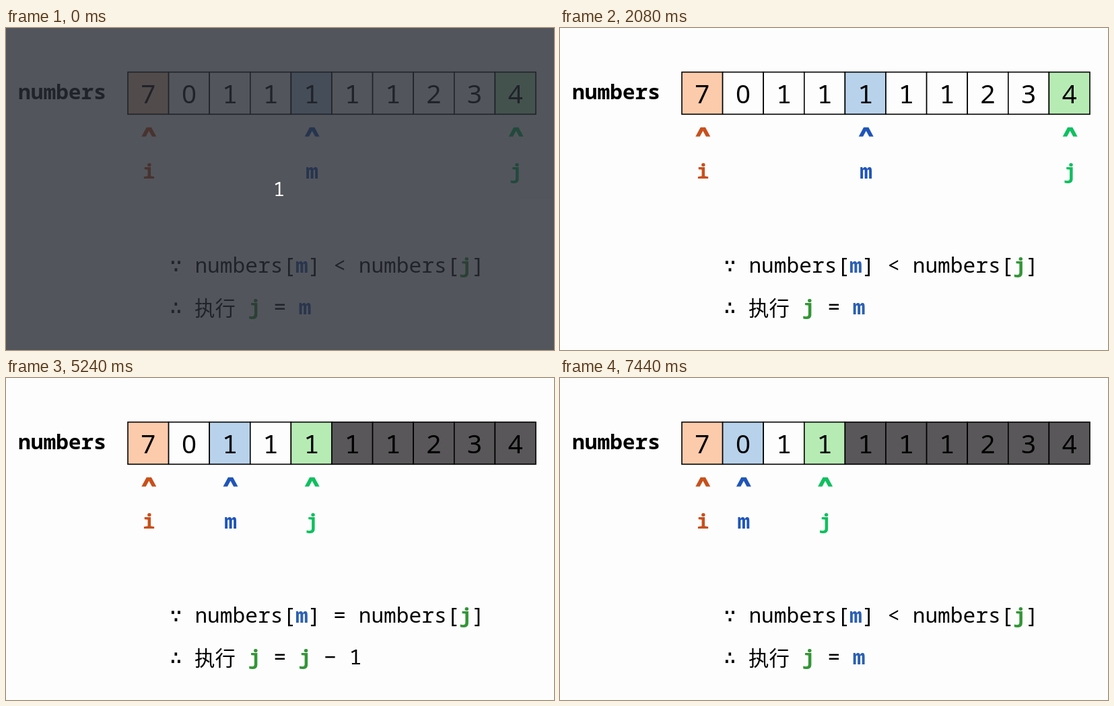
Write an HTML page that moves like this. It is 814 by 479 pixels and loops after 8000 ms.

```html
<!DOCTYPE html>
<html lang="zh-CN">
<head>
<meta charset="utf-8">
<title>numbers</title>
<style>
  html, body { margin: 0; width: 814px; height: 479px; overflow: hidden; background: #fefdfe; }
  svg { display: block; }
  text { font: 31.2px "Noto Sans Mono", "DejaVu Sans Mono", monospace; white-space: pre; }
  .bold { font-weight: 700; }
  .mid { text-anchor: middle; }
  .digit { font: 38.5px "Noto Sans", sans-serif; }
  .one { font: 38.5px "Noto Sans Mono", monospace; }
  .math { font-family: "DejaVu Sans Mono", monospace; }
  .han { font: 300 30.4px "Noto Sans CJK SC", "Noto Sans CJK", sans-serif; }
  .count { font: 29px "Noto Sans Mono", monospace; fill: #fff; }
</style>
</head>
<body>
<svg id="stage" width="814" height="479" viewBox="0 0 814 479"></svg>
<script>
const stage = document.getElementById('stage');
const LOOP = 8000, LEFT = 181, CELL = 60.6, TOP = 65.6, HEIGHT = 62.7;
const numbers = [7, 0, 1, 1, 1, 1, 1, 2, 3, 4];
const pointers = {
  i: { fill: '#fccbab', ink: '#c8501c' },
  m: { fill: '#b8d2eb', ink: '#1f55b8' },
  j: { fill: '#b7ebb4', ink: '#0fc060' },
};
const steps = [
  { at: 0, i: 0, m: 4, j: 9, sign: '&lt;', action: 'j = m', paused: true },
  { at: 400, i: 0, m: 4, j: 9, sign: '&lt;', action: 'j = m' },
  { at: 3200, i: 0, m: 2, j: 4, sign: '=', action: 'j = j − 1' },
  { at: 6600, i: 0, m: 1, j: 3, sign: '&lt;', action: 'j = m' },
];

const center = index => LEFT + CELL * (index + 0.5);
const text = (x, y, cls, content, fill = '#000') =>
  `<text x="${x}" y="${y}" class="${cls}" fill="${fill}">${content}</text>`;
const variable = name =>
  `<tspan class="bold" fill="${name === 'm' ? '#2c60b2' : '#339636'}">${name}</tspan>`;

function cell(value, index, step) {
  const owner = Object.keys(pointers).find(name => step[name] === index);
  const fill = owner ? pointers[owner].fill : index > step.j ? '#595759' : '#fefdfe';
  return `<rect x="${LEFT + CELL * index}" y="${TOP}" width="${CELL}" height="${HEIGHT}"
    fill="${fill}" stroke="#000" stroke-width="1.6"/>` +
    text(center(index), 112, 'mid ' + (value === 1 ? 'one' : 'digit'), value);
}

function pointer(name, step) {
  const x = center(step[name]) + 1, { ink } = pointers[name];
  return `<path d="M${x - 11} 161.5l7.4 -13.7h7.2l7.4 13.7h-6.4l-4.6 -8.6 -4.6 8.6z" fill="${ink}"/>` +
    text(x, 224, 'bold mid', name, ink);
}

function draw(step) {
  stage.innerHTML =
    text(18, 106, 'bold', 'numbers') +
    numbers.map((value, index) => cell(value, index, step)).join('') +
    Object.keys(pointers).map(name => pointer(name, step)).join('') +
    text(243, 364, 'math', '∵') +
    text(280.4, 364, '', `numbers[${variable('m')}] ${step.sign} numbers[${variable('j')}]`) +
    text(243, 426, 'math', '∴') +
    text(280, 427.5, 'han', '执行') +
    text(360, 426, '', step.action.replace(/[mj]/g, variable)) +
    (step.paused
      ? '<rect width="814" height="479" fill="#282c34" fill-opacity=".8"/>' +
        text(405.5, 250, 'count mid', '1')
      : '');
}

let shown;
function tick() {
  const time = performance.now() % LOOP;
  const step = steps.findLast(({ at }) => at <= time);
  if (step !== shown) draw(shown = step);
  requestAnimationFrame(tick);
}
tick();
</script>
</body>
</html>
```
